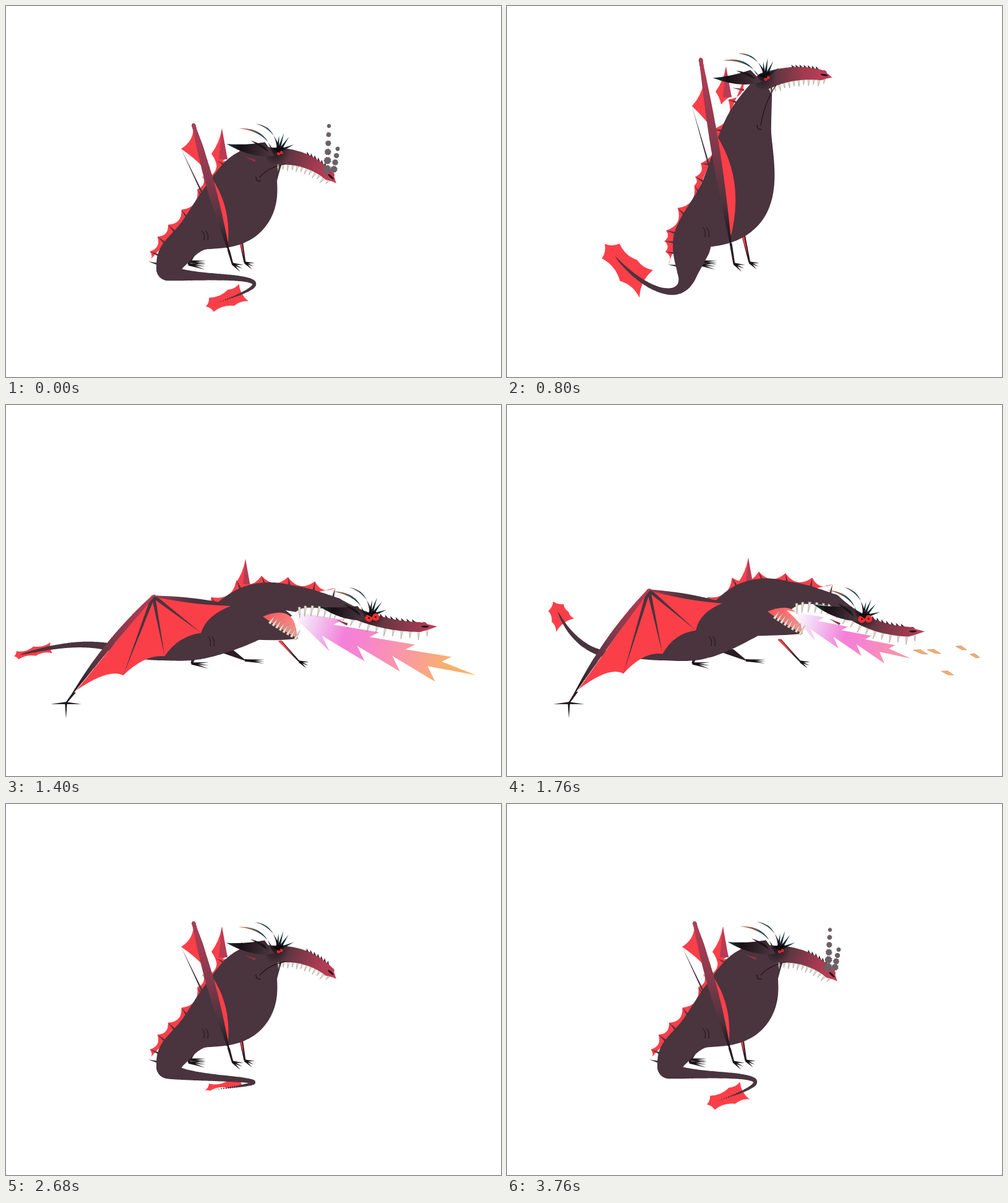
Write an HTML page with a canvas that moves like this. It is 800 by 600 pixels and loops after 3880 ms.

```html
<!DOCTYPE html>
<html lang="en">
<head>
<meta charset="utf-8">
<title>Dragon</title>
<style>
html, body { margin: 0; width: 100%; height: 100%; overflow: hidden; background: #fff; }
canvas { display: block; }
</style>
</head>
<body>
<canvas id="stage" width="800" height="600"></canvas>
<script>
const ctx = document.getElementById('stage').getContext('2d');
const LOOP = 3880, GROUND = 415;
const SKIN = '#4a343d', RED = '#fb3f49', CRIMSON = '#b63c55', BLACK = '#1b1318';

// body: x y radius from skull to tail root; head: snout tip and sag;
// tail: Bezier controls and end; leaf: start, width, lower side;
// wing: elbow, hand, shoulder, web control, flap; feet: far hind, near hind, far hand.
const sit = {
  body: [435, 243, 14, 396, 274, 43, 370, 325, 58, 308, 367, 30, 272, 402, 25, 262, 425, 19],
  head: [534, 287, -26], tail: [250, 450, 520, 420, 338, 481], leaf: [.86, 16, 1],
  wing: [303, 192, 366, 417, 328, 270, 335, 310, 283, 231],
  far: [349, 198], jaw: [410, 277], feet: [291, 295, 386], open: [0]
};
const curl = { ...sit, head: [534, 283, -26], tail: [250, 450, 520, 440, 335, 462], leaf: [.86, 14, .1] };
const tall = {
  body: [415, 212, 14, 389, 257, 38, 368, 325, 58, 308, 362, 33, 298, 390, 30, 292, 428, 17],
  head: [526, 208, -19], tail: [290, 485, 225, 465, 174, 404], leaf: [.62, 25, 1],
  wing: [313, 190, 367, 417, 333, 270, 340, 310, 299, 236],
  far: [354, 197], jaw: [410, 255], feet: [308, 310, 392], open: [0]
};
const crouch = {
  body: [392, 240, 20, 342, 241, 46, 338, 322, 49, 288, 386, 34, 255, 405, 26, 246, 422, 18],
  head: [467, 342, 26], tail: [235, 475, 515, 402, 355, 485], leaf: [.86, 13, 1],
  wing: [222, 216, 367, 417, 315, 262, 261, 305, 233, 277],
  far: [340, 235], jaw: [354, 260], feet: [283, 298, 386], open: [0]
};
const lunge = {
  body: [535, 322, 10, 470, 312, 19, 400, 335, 44, 318, 378, 32, 250, 388, 25, 200, 401, 8],
  head: [698, 358, 26], tail: [140, 378, 85, 388, 22, 404], leaf: [.7, 9, 1],
  wing: [238, 309, 97, 482, 366, 324, 273, 420, 190, 365],
  far: [387, 249], jaw: [415, 342], feet: [386, 300, 474], open: [1]
};
const spent = {
  ...lunge,
  body: lunge.body.map((v, i) => i < 9 && i % 3 < 2 ? v - 6 : v),
  head: [676, 366, 34], tail: [150, 415, 105, 385, 82, 334], leaf: [.8, 18, 1],
  wing: [229, 299, 100, 482, 350, 320, 270, 415, 183, 355],
  far: [390, 247], jaw: [421, 334]
};

// The rearing pose is the tall one stretched upwards.
const stretch = (list, n) => list.map((v, i) => i % n === 1 && v < 350 ? v - (350 - v) * .65 : v);
const rear = { ...tall };
for (const key of ['body', 'head', 'wing', 'far', 'jaw']) rear[key] = stretch(tall[key], key === 'body' || key === 'head' ? 3 : 2);

const keys = [[0, sit], [480, crouch], [680, rear], [800, rear], [960, lunge], [1480, lunge], [1760, spent],
  [1880, spent], [2280, tall], [2680, curl], [2920, sit], [LOOP, sit]];
// Start of each stretch of time and the hold of its drawings.
const holds = [[0, 160], [480, 80], [560, 120], [800, 160], [960, 40], [1000, 80], [1640, 120], [1880, 160],
  [2040, 120], [2280, 160], [2440, 120], [3040, 96], [3520, 80], [3760, 120]];

const lerp = (a, b, u) => a + (b - a) * u;
const mix = (p, q, u) => p.map((v, i) => lerp(v, q[i], u));
const smooth = u => u * u * (3 - 2 * u);
const group = (list, n = 2) => Array.from({ length: list.length / n }, (_, i) => list.slice(i * n, i * n + n));
const series = (n, f) => Array.from({ length: n }, (_, i) => f(i));

function poseAt(t) {
  const i = keys.findLastIndex(key => key[0] <= t), [[t0, p], [t1, q]] = [keys[i], keys[i + 1]];
  const u = smooth((t - t0) / (t1 - t0));
  return Object.fromEntries(Object.keys(p).map(key => [key, mix(p[key], q[key], u)]));
}

// Curves are functions from a parameter to [x, y, radius].
const spline = nodes => u => {
  const last = nodes.length - 1, i = Math.max(0, Math.min(last - 1, Math.floor(u))), s = u - i;
  const [a, b, c, d] = [-1, 0, 1, 2].map(k => nodes[Math.max(0, Math.min(last, i + k))]);
  return b.map((v, k) => v + s / 2 * (c[k] - a[k] + s * (2 * a[k] - 5 * v + 4 * c[k] - d[k] + s * (3 * (v - c[k]) + d[k] - a[k]))));
};
const quad = (a, b, c) => s => mix(mix(a, b, s), mix(b, c, s), s);
const cubic = (a, b, c, d) => s => mix(quad(a, b, c)(s), quad(b, c, d)(s), s);
const withRadius = (path, radius) => s => [...path(s), radius(s)];

function direction(path, u) {
  const a = path(u - .01), b = path(u + .01), d = Math.hypot(b[0] - a[0], b[1] - a[1]) || 1;
  return [(b[0] - a[0]) / d, (b[1] - a[1]) / d];
}
function edge(path, u, side, extra = 0) {
  const [x, y, r] = path(u), [dx, dy] = direction(path, u), k = side * (r + extra);
  return [x - dy * k, y + dx * k];
}

function paint(color) { ctx.fillStyle = color; ctx.fill(); }
function outline(color, width) { ctx.strokeStyle = color; ctx.lineWidth = width; ctx.stroke(); }
function linear(a, b, ...stops) {
  const g = ctx.createLinearGradient(a[0], a[1], b[0], b[1]);
  stops.forEach(([at, color]) => g.addColorStop(at, color));
  return g;
}
function polygon(pts, color) {
  ctx.beginPath();
  pts.forEach(p => ctx.lineTo(p[0], p[1]));
  ctx.closePath();
  paint(color);
}

function tube(path, to, color) {
  const count = 120;
  ctx.beginPath();
  for (let i = 0; i <= count; i++) {
    const [x, y, r] = path(to * i / count);
    ctx.moveTo(x, y);
    ctx.arc(x, y, Math.max(.3, r), 0, 7);
  }
  paint(color);
}

function scallop(pts, k, color) {
  ctx.beginPath();
  ctx.moveTo(...pts[0]);
  for (let i = 1; i < pts.length; i++) {
    const [a, b] = [pts[i - 1], pts[i]];
    ctx.quadraticCurveTo((a[0] + b[0]) / 2 - (b[1] - a[1]) * k, (a[1] + b[1]) / 2 + (b[0] - a[0]) * k, ...b);
  }
  ctx.closePath();
  paint(color);
}

function spike([x, y], [tx, ty], w, color) {
  const d = Math.hypot(tx - x, ty - y) || 1, nx = (y - ty) / d * w / 2, ny = (tx - x) / d * w / 2;
  polygon([[x + nx, y + ny], [tx, ty], [x - nx, y - ny]], color);
}

function tooth(path, u, side, length) {
  spike(edge(path, u, side, -3), edge(path, u, side, length), 4.2, '#e9e4d3');
  outline('#8f8c7c', .6);
}

function limb(root, ankle, width, turn, spread, length) {
  polygon([[root[0] - width / 2, root[1]], [root[0] + width / 2, root[1]], [ankle[0] + 1.5, ankle[1]], [ankle[0] - 1.5, ankle[1]]], '#2a1e24');
  for (const k of [-1, 0, 1]) {
    const a = turn + k * spread;
    spike(ankle, [ankle[0] + Math.cos(a) * length, ankle[1] + Math.sin(a) * length], 3.5, BLACK);
  }
}

// A curved blade growing from near the origin.
function blade(base, bend, tip, width, color) {
  ctx.beginPath();
  ctx.moveTo(base[0], base[1] - width / 2);
  ctx.quadraticCurveTo(bend[0], bend[1], ...tip);
  ctx.quadraticCurveTo(bend[0] + width * .5, bend[1] + width, base[0] + width * .7, base[1] + width / 2);
  ctx.closePath();
  paint(color);
}

function drawCrest([x, y], turn, eye) {
  ctx.save();
  ctx.translate(x, y);
  ctx.rotate(turn);
  blade([-20, -3], [-52, -9], [-82, -12], 22, linear([-80, -10], [-12, 6], [0, '#16373d'], [.3, '#171014'], [1, SKIN]));
  blade([-20, -2], [-28, -12], [-43, -17], 8, BLACK);
  const horn = linear([0, 0], [-48, -42], [.15, '#1b1318'], [.55, '#1c4b53'], [.95, '#a56450']);
  blade([-12, -3], [-22, -38], [-62, -37], 7, horn);
  blade([-1, -4], [-6, -41], [-35, -44], 7, horn);
  const hair = linear([0, 0], [22, -26], [.1, '#120c10'], [.8, '#1d4f57']);
  series(4, i => spike([i * 2, -1], [3 + i * 8, -24 - 8 * Math.sin(i * 1.3) + i * 3], 5, hair));
  spike([-36, 16], [-54, 9], 4, '#8f3344');
  ctx.translate(4, 4);
  for (const side of [-.9, .9]) {
    for (const [size, color] of [[eye, '#ff2b2f'], [eye * .25, BLACK]]) {
      ctx.beginPath();
      ctx.arc(side * eye, -side, size, 0, 7);
      paint(color);
    }
  }
  ctx.beginPath();
  [[-10, -7], [-1, -2], [1, -7], [6, -9]].forEach(p => ctx.lineTo(...p));
  outline('#0c070a', 2.5);
  ctx.restore();
}

function drawHead(pose, spine) {
  const [x, y, r] = pose.body, [tx, ty, sag] = pose.head, [open] = pose.open, d = Math.hypot(tx - x, ty - y);
  const bend = [(x + tx) / 2 - (ty - y) / d * sag, (y + ty) / 2 + (tx - x) / d * sag];
  const snout = withRadius(quad([x, y], bend, [tx, ty]), s => lerp(r, 7.5, s) * Math.max(0, Math.min(1, (1 - s) * 6)));
  if (open > .7) series(6, i => tooth(spine, .95 - i * .16, -1, 14));
  series(12, i => tooth(snout, .04 + i * .078, 1, (10 + open * 3) * (i % 2 ? .8 : 1)));
  series(7, i => spike(edge(snout, .45 + i * .055, -1, -2), edge(snout, .42 + i * .055, -1, 4), 5, '#33212a'));
  const nostril = edge(snout, .87, -1, -3), fill = linear([x, y], [tx, ty],
    [lerp(.05, .3, open), SKIN], [lerp(.6, .85, open), '#a33a50'], [1, '#c5405a']);
  tube(snout, 1, fill);
  ctx.beginPath();
  ctx.arc(...nostril, 5, 0, 7);
  paint(fill);
  const [dx, dy] = direction(snout, .87);
  ctx.beginPath();
  ctx.ellipse(...edge(snout, .88, -1, -5), 6, 1.6, Math.atan2(dy, dx), 0, 7);
  paint(BLACK);

  if (open < .5) {
    const [cx, cy] = pose.jaw, start = edge(snout, .15, 1, -1);
    ctx.beginPath();
    ctx.moveTo(...start);
    ctx.quadraticCurveTo((start[0] + cx) / 2 - 6, (start[1] + cy) / 2 - 6, cx, cy);
    ctx.moveTo(cx - 6, cy - 1);
    ctx.quadraticCurveTo(cx - 6, cy + 8, cx + 2, cy + 6);
    outline(BLACK, 1.2);
  }
  const s = open * .33, aim = direction(snout, s), brow = edge(snout, s, -1, -r * .35);
  const shade = ctx.createRadialGradient(...brow, 2, ...brow, 24);
  shade.addColorStop(0, '#140d11b0');
  shade.addColorStop(1, '#140d1100');
  tube(snout, .5, shade);
  drawCrest([brow[0] + 4 * (1 - open), brow[1]], Math.atan2(aim[1], aim[0]) * .45 - open * .12, lerp(2.5, 6, open));
}

// Barbs sweep back along a slanting axis.
function drawFlame(reach) {
  const rise = Math.min(1, reach * 1.2);
  const at = (s, off) => [452 + 324 * s * reach, 332 + (105 * s + off) * rise];
  const upper = series(4, i => [at(.3 + .19 * i, -16), at(.25 + .19 * i, -3)]).flat();
  const lower = series(4, i => [at(.23 + .185 * i, 42 - 3 * i), at(.19 + .185 * i, 21 - 3 * i)]).flat().reverse();
  polygon([at(0, 0), ...upper, at(1, 0), ...lower, at(.06, 9)], linear([465, 338], [765, 435], [0, '#fff'], [.1, '#f3d3f4'],
    [.28, '#f47fda'], [.42, '#f887c8'], [.62, '#f99aa2'], [.8, '#f8ae74'], [1, '#f5b65a']));
}

function drawEmbers(t) {
  for (let i = 0; i < 5; i++) {
    const x = 668 + 22 * i + (t - 1760) * .1, y = 410 + 24 * Math.sin(i * 2.2 + 3.6), s = 12 - i;
    polygon([[x - s, y - 3], [x, y - 4], [x + s, y + s * .3], [x + s * .2, y + 3]], '#f6ab6c');
    outline('#a88968', .5);
  }
}

function drawSmoke(t) {
  if (t >= 600 && t < 3040) return;
  const grow = t >= 3040 ? (t - 3000) / 880 : 1, scatter = t < 600 ? t / 480 : 0;
  for (let i = 0; i < 10; i++) {
    const side = i > 5, k = side ? i - 6 : i;
    const x = side ? 530 + 2 * k : 519 + .6 * k, y = 264 - (side ? 11 : 14) * k * grow, r = (side ? 5.5 : 6.5) - .65 * k;
    const cx = lerp(x, 520 + 5 * i, scatter), cy = lerp(y, 229 + 14.5 * i, scatter), size = lerp(r, 4.5, scatter);
    ctx.beginPath();
    for (let b = 0; b < 10; b++) {
      const a = b * .7 + i, far = b ? size * .75 : 0, px = cx + Math.cos(a) * far, py = cy + Math.sin(a) * far;
      ctx.moveTo(px, py);
      ctx.arc(px, py, size * (b ? .3 : .85), 0, 7);
    }
    paint('#6a6066');
  }
}

function drawWing(pose) {
  const [elbow, hand, shoulder, web, flap] = group(pose.wing), [open] = pose.open;
  const wrist = mix(elbow, hand, .88), rim = quad(wrist, web, shoulder);
  const tips = [.25, .5, .75].map(rim);
  polygon([elbow, wrist, ...tips, shoulder], RED);
  scallop([wrist, flap, elbow], .3 * (1 - open), RED);
  // White-free notches: the web is cut by redrawing it with curved edges.
  return { elbow, hand, shoulder, flap, wrist, tips, open };
}

function paintWing(pose) {
  const [elbow, hand, shoulder, web, flap] = group(pose.wing), [open] = pose.open;
  const wrist = mix(elbow, hand, .88), rim = quad(wrist, web, shoulder), tips = [.25, .5, .75].map(rim);
  const rimPoints = [wrist, ...tips, shoulder];
  ctx.beginPath();
  ctx.moveTo(...elbow);
  ctx.lineTo(...wrist);
  for (let i = 1; i < rimPoints.length; i++) {
    const [a, b] = [rimPoints[i - 1], rimPoints[i]];
    ctx.quadraticCurveTo(...mix([(a[0] + b[0]) / 2, (a[1] + b[1]) / 2], elbow, .17), ...b);
  }
  paint(RED);
  if (open < .9) {
    scallop([wrist, flap, elbow], .3 * (1 - open), RED);
    polygon([elbow, flap, wrist], 'transparent');
    spike(wrist, flap, 6 * (1 - open), SKIN);
  }
  tips.forEach(tip => spike(elbow, tip, 6, SKIN));
  const upperArm = withRadius(s => mix(elbow, shoulder, s), s => 1 + 3 * Math.sin(s * 3.1));
  tube(upperArm, 1, linear(elbow, shoulder, [0, '#9b3b50'], [.5, SKIN]));
  const middle = [(elbow[0] + hand[0]) / 2 - 8 * open, (elbow[1] + hand[1]) / 2 - 6 * open];
  const spar = withRadius(quad(elbow, middle, hand), s => 1 + lerp(6, 4, open) * Math.sin(Math.PI * Math.min(1, .08 + s)));
  tube(spar, 1, linear(elbow, hand, [0, CRIMSON], [.35, '#8d3a4d'], [.7, SKIN], [.9, BLACK]));
  limb(mix(elbow, hand, .9), hand, 4, lerp(.45, 1.57, open), lerp(.35, 1.5, open), lerp(18, 25, open));
}

function drawTail(pose, root) {
  const [c1, c2, end] = group(pose.tail), [start, width, lower] = pose.leaf;
  const path = withRadius(cubic(root.slice(0, 2), c1, c2, end), s => (root[2] - 6) * Math.max(0, 1 - s) ** 5 + 6 * Math.sqrt(Math.max(0, 1 - s)));
  const [dx, dy] = direction(path, 1);
  const barb = side => [0, .5, 1].map(u => {
    const p = path(lerp(start, 1, u)), aim = direction(path, lerp(start, 1, u)), w = width * side * (1 - .25 * u);
    return [p[0] - aim[1] * w + aim[0] * width * .4, p[1] + aim[0] * w + aim[1] * width * .4];
  });
  const tip = [end[0] + dx * width, end[1] + dy * width];
  scallop([tip, ...barb(1).reverse(), ...barb(-lower), tip], .22, RED);
  tube(path, 1, SKIN);
}

function drawMouth(pose, reach) {
  const [x, y] = pose.jaw, [bx, by, br] = pose.body.slice(6, 9), tip = [x + 57, y + 36], hinge = [x + 24, y + 18];
  ctx.beginPath();
  ctx.moveTo(x, y);
  ctx.lineTo(...tip);
  ctx.quadraticCurveTo(x + 15, y + 40, bx, by + br);
  paint(SKIN);
  ctx.beginPath();
  ctx.moveTo(x, y);
  ctx.quadraticCurveTo(x + 45, y - 18, tip[0] - 4, tip[1] - 20);
  ctx.lineTo(...tip);
  ctx.quadraticCurveTo(...hinge, x, y);
  paint(linear([x, y], tip, [0, '#f4545c'], [1, '#ff9a94']));
  if (reach) drawFlame(reach);
  const lip = withRadius(quad(tip, hinge, [x, y]), () => 0);
  series(8, i => tooth(lip, .05 + i * .1, 1, 13));
}

function drawDragon(pose, reach) {
  const nodes = group(pose.body, 3), spine = spline(nodes), [open] = pose.open;
  const [fx, fy] = pose.far, [hindFar, hindNear, handFar] = pose.feet;
  scallop([[fx, fy], [fx + 9, fy + 48], [fx - 8, fy + 62], [fx - 17, fy + 41], [fx, fy]], .12, RED);
  polygon([[fx, fy], [fx + 9, fy + 50], [fx - 5, fy + 50]], CRIMSON);

  const reachDown = (node, x, u) => mix(node.slice(0, 2), [x, GROUND], u);
  const palm = [handFar, GROUND], elbow = reachDown(nodes[2], handFar, .58);
  limb(elbow, palm, 6, .4, .35, 16);
  spike([elbow[0] - 1, elbow[1]], mix(elbow, palm, .75), 4, RED);
  limb(reachDown(nodes[3], hindFar, .45), [hindFar, GROUND - 2], lerp(9, 34, open), .06, .1, 32);

  const along = series(11, i => .2 + .46 * i), tips = along.map(u => edge(spine, u, 1, 14));
  scallop(tips, -.5, RED);
  along.forEach((u, i) => spike(edge(spine, u, 1, -8), tips[i], 5, SKIN));

  drawTail(pose, nodes[5]);
  limb([hindNear + 8, GROUND - 18], [hindNear, GROUND + 3], 12, .12, .18, 28);
  tube(spine, 5, SKIN);

  const [kx, ky] = nodes[3];
  ctx.beginPath();
  for (const shift of [8, 14]) {
    ctx.moveTo(kx + shift, ky - 4);
    ctx.quadraticCurveTo(kx + shift + 6, ky, kx + shift + 4, ky + 12);
  }
  outline(BLACK, 1);

  if (open > .7) drawMouth(pose, reach);
  drawHead(pose, spine);
  paintWing(pose);
}

function flameReach(t, index) {
  if (t < 960 || t >= 2040) return 0;
  if (t > 1480) return 1 - (t - 1480) / 740;
  return Math.min(1, .75 + (t - 960) / 160) - .05 * (index % 2);
}

function frame(now) {
  const time = now % LOOP, [from, hold] = holds.findLast(h => h[0] <= time);
  const index = Math.floor((time - from) / hold), t = from + index * hold;
  ctx.fillStyle = '#fff';
  ctx.fillRect(0, 0, 800, 600);
  drawDragon(poseAt(t), flameReach(t, index));
  if (t >= 1640 && t < 1880) drawEmbers(t);
  drawSmoke(t);
  requestAnimationFrame(() => frame(performance.now() - start));
}
const start = performance.now();
frame(0);
</script>
</body>
</html>
```
